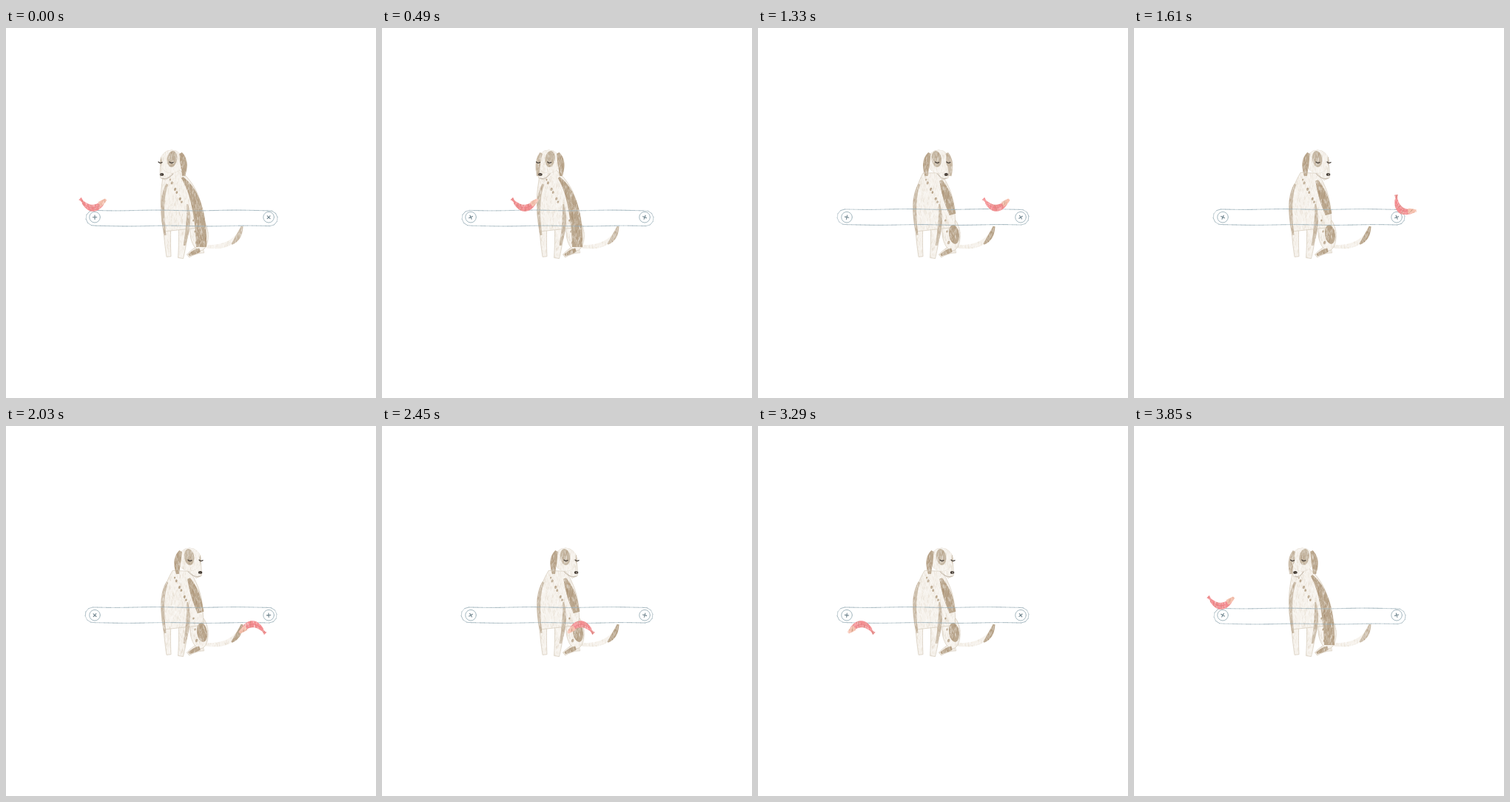
Write an HTML page with a canvas that moves like this. It is 500x500 px and loops after 3.92 s.

```html
<!DOCTYPE html>
<html lang="en">
<head>
<meta charset="utf-8">
<title>Dog and conveyor</title>
<style>
  html, body { margin: 0; width: 100%; height: 100%; overflow: hidden; background: #fff; }
  canvas { display: block; width: 500px; height: 500px; }
</style>
</head>
<body>
<canvas id="stage" width="500" height="500"></canvas>
<script>
const ctx = document.getElementById('stage').getContext('2d');
const { PI, sin, cos, abs, max, min, floor } = Math;
const LOOP = 3920, STEP = 70, SPEED = 0.1537;
const CREAM = '#f6f2ec', BROWN = '#bba88f', TAN = '#cdbfac', INK = '#453d36';
const PENCIL = '#d8cebf', BLUE = '#9aafb8', RED = '#f48f92', PALE = '#f6c0ae';

let seed = 1;
function rnd() {
  seed = seed * 16807 % 2147483647;
  return seed / 2147483647;
}
const jitter = size => (rnd() - 0.5) * size;
const clamp = v => max(0, min(1, v));

// Fills a path and hatches the box around it with crayon strokes.
function crayon(color, path, [x, y, w, h]) {
  ctx.fillStyle = color;
  ctx.fill(path);
  ctx.save();
  ctx.clip(path);
  ctx.lineWidth = 0.7;
  const ink = color === CREAM ? 'rgba(195,178,150,.22)' : 'rgba(140,105,70,.24)';
  for (const tone of [ink, 'rgba(255,255,255,.42)']) {
    ctx.strokeStyle = tone;
    ctx.beginPath();
    for (let i = w * h / 14; i > 0; i--) {
      const px = x + rnd() * w, py = y + rnd() * h;
      ctx.moveTo(px, py);
      ctx.lineTo(px + jitter(2.5), py + 2 + rnd() * 3);
    }
    ctx.stroke();
  }
  ctx.restore();
}

// A curved stroke whose width runs from w0 to w1, plus a swelling in the middle.
function limb(color, x0, y0, cx, cy, x1, y1, w0, w1, bulge = 0) {
  const left = [], right = [];
  for (let i = 0; i <= 16; i++) {
    const f = i / 16, g = 1 - f;
    const x = g * g * x0 + 2 * g * f * cx + f * f * x1;
    const y = g * g * y0 + 2 * g * f * cy + f * f * y1;
    const a = Math.atan2(g * (cy - y0) + f * (y1 - cy), g * (cx - x0) + f * (x1 - cx));
    const r = (w0 + (w1 - w0) * f + bulge * sin(PI * f)) / 2;
    left.push([x + r * sin(a), y - r * cos(a)]);
    right.unshift([x - r * sin(a), y + r * cos(a)]);
  }
  const path = new Path2D(), edge = [...left, ...right];
  edge.forEach(p => path.lineTo(...p));
  path.closePath();
  const xs = edge.map(p => p[0]), ys = edge.map(p => p[1]);
  const x = min(...xs), y = min(...ys);
  crayon(color, path, [x, y, max(...xs) - x, max(...ys) - y]);
  return path;
}

function oval(color, x, y, rx, ry, turn = 0) {
  const path = new Path2D();
  path.ellipse(x, y, rx, ry, turn, 0, 2 * PI);
  const r = max(rx, ry);
  crayon(color, path, [x - r, y - r, 2 * r, 2 * r]);
  return path;
}

function trace(path, color = PENCIL, width = 0.8) {
  ctx.strokeStyle = color;
  ctx.lineWidth = width;
  ctx.stroke(path);
}

function arc(color, width, x0, y0, cx, cy, x1, y1) {
  trace(new Path2D(`M${x0} ${y0} Q${cx} ${cy} ${x1} ${y1}`), color, width);
}

function body(look, early) {
  const neck = 230 + 7 * look;
  limb(CREAM, 268, 295, 308, 300, 319, 269, 4, 3, 3);
  limb(early ? TAN : BROWN, 305, 292, 315, 284, 319, 268, 2, 3, 4);

  trace(limb(CREAM, 218, 250, 217, 280, 220, 309, 12, 6));
  trace(limb(CREAM, 266, 298, 256, 300, 246, 308, 12, 5));
  trace(oval(CREAM, 261, 278, 12, 23, -0.1));
  trace(limb(CREAM, 241, 250, 240, 285, 236, 311, 16, 7));
  trace(limb(CREAM, neck, 196, 236, 226, 241, 272, 24, 52, 13));

  limb(TAN, 218, 211, 207, 232, 215, 280, 3, 3, 2);
  limb(TAN, 245, 238, 249, 262, 241, 294, 2, 3, 3);
  limb(BROWN, 262, 300, 256, 302, 247, 307, 5, 3, 2);
  if (early) {
    limb(BROWN, neck + 15, 202, 264, 230, 264, 296, 3, 14, 5);
  } else {
    limb(BROWN, 247, 206, 256, 226, 263, 252, 4, 9, 5);
    oval(BROWN, 265, 279, 7, 13, -0.15);
  }
  for (let i = 0; i < 9; i++) {
    const low = i % 3 === 2, r = 1 + (i * 0.62 % 1) * 0.7;
    const x = low ? 252 + i * 0.7 : 225 + i * 2.2 + 3 * look;
    const y = low ? 250 + i * 5 : 205 + i * 4.3;
    oval(BROWN, x, y, r, r * 1.4, 0.3);
  }
}

// One head for every direction: look runs from -1 (left) to 1 (right).
function head(look) {
  const x = 236 + 11 * look, face = x + 9 * look, nose = x + 15 * look + 0.5;
  const ear = s => limb(s * look < -0.4 ? BROWN : TAN,
    x + s * (13 - 2 * abs(look)), 169, x + s * (20 - 3 * abs(look)), 180,
    x + s * (18 - 3 * abs(look)), 200, 4, 4, 5 - 3 * max(0, s * look));

  const muzzle = limb(CREAM, x + 4 * look, 184, x + 9 * look, 193, nose - 2 * look, 204, 25, 8, 1);
  const skull = new Path2D();
  skull.ellipse(x + look, 180.5, 15.5, 15.5, 0, 0, 2 * PI);
  trace(skull);
  trace(muzzle);
  crayon(CREAM, skull, [x - 17, 165, 34, 31]);
  ctx.save();
  ctx.clip(skull);
  for (const s of [-1, 1]) {
    const far = max(0, s * look);
    oval('#c7b9a5', face + s * 8.5, 177, 6.7 - 4 * far, 11 - 2 * far, s * 0.15);
  }
  ctx.restore();
  for (const s of [-1, 1]) {
    if (s * look < 0.9) ear(s);
    const e = face + s * (8 - abs(look) * 0.5);
    arc(INK, 1.2, e - 2.5, 181, e, 183.5, e + 2.5, 181.5);
  }
  limb(INK, nose - 2.6, 198, nose, 198, nose + 2.6, 198, 2, 2, 2);
  arc('#afa294', 0.7, nose, 203, nose - 8 * look, 206, x - 1 * look, 197);
}

// Point and tangent angle at distance s along a track around both pulleys.
function track(s, r, x0, x1, y) {
  const side = x1 - x0, bend = PI * r, half = side + bend;
  const back = s % (2 * half) >= half, d = s % half;
  const turn = clamp((d - side) / bend) * PI, sign = back ? -1 : 1;
  return {
    x: (back ? x1 : x0) + sign * (min(d, side) + r * sin(turn)),
    y: y - sign * r * cos(turn),
    turn: turn + (back ? PI : 0),
    size: 2 * half
  };
}

function belt(step, early) {
  const x = early ? 118.5 : 117.5, y = early ? 257 : 255.5;
  const at = s => track(s, 10.5, x, x + 238, y);
  const { size } = at(0), parts = 90;
  for (let i = 0; i < parts; i++) {
    const a = at(i / parts * size), b = at((i + 1) / parts * size);
    const bow = sin(i * 0.35) * 0.4;
    ctx.globalAlpha = 0.6 + rnd() * 0.4;
    arc(BLUE, 0.9, a.x, a.y + bow, (a.x + b.x) / 2, (a.y + b.y) / 2 + bow, b.x, b.y + bow);
  }
  ctx.globalAlpha = 1;
  [120, 355].forEach((px, i) => {
    const rim = new Path2D();
    rim.arc(px, 255.7, 7.3, 0, 2 * PI);
    trace(rim, BLUE, 0.9);
    ctx.save();
    ctx.translate(px, 255.7);
    ctx.rotate((step * 48 + i * 45) * PI / 180);
    trace(new Path2D('M-2.7 0H2.7M0-2.7V2.7'), '#6c828c', 1.1);
    ctx.restore();
  });
}

function sausage(t) {
  const at = s => track(s, 18, 117, 353, 255.5);
  const p = at(min(t * SPEED, at(0).size));
  ctx.save();
  ctx.translate(p.x, p.y);
  ctx.rotate(p.turn);
  limb(RED, -17, -7, -15, -5, -12, -1, 5, 3, -1);
  limb(RED, -13, -2, 0, 13, 13, -1, 4, 6, 4);
  limb(PALE, 9, 1, 14, -2, 18, -6, 7, 3, 1);
  arc('#ea7880', 0.7, -11, 1, 0, 10, 9, 2);
  ctx.restore();
}

function draw(step) {
  const t = step * STEP;
  const look = 2 * clamp((t - 420) / 1080) - 2 * clamp((t - 3430) / (LOOP - 3430)) - 1;
  const early = look < -0.35;
  seed = 911 + step % 4 * 4057;
  ctx.clearRect(0, 0, 500, 500);
  ctx.lineCap = ctx.lineJoin = 'round';
  body(look, early);
  head(look);
  belt(step, early);
  sausage(t);
}

let shown = -1;
function tick() {
  const step = floor(performance.now() % LOOP / STEP);
  if (step !== shown) draw(shown = step);
  requestAnimationFrame(tick);
}
tick();
</script>
</body>
</html>
```
